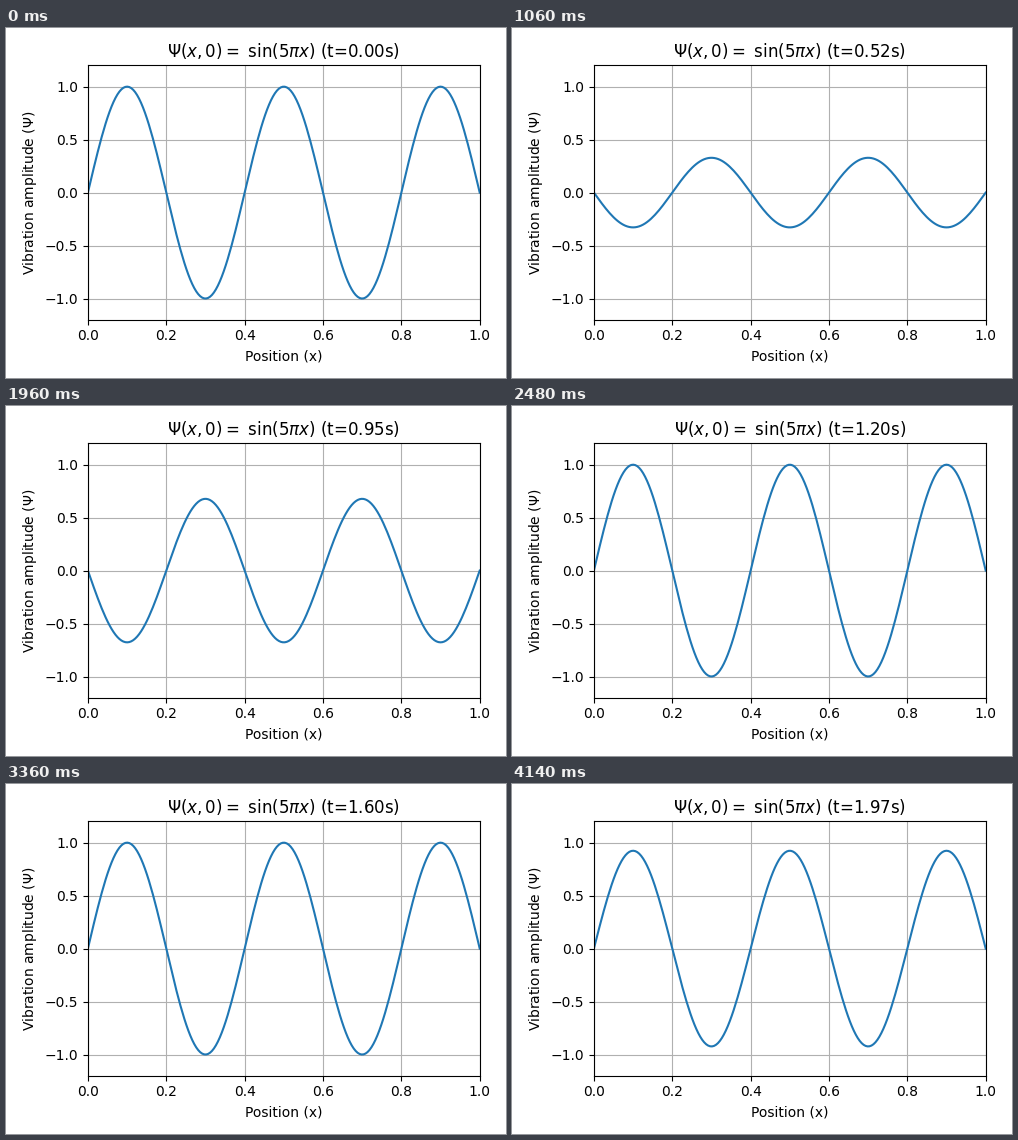
A matplotlib script that plays this animation: 500 by 350 pixels, repeating every 4.16 s.

```python
import numpy as np
import matplotlib.pyplot as plt
from matplotlib.animation import FuncAnimation

TICK = 20                          # ms per animation frame
HOLDS = [1, 5, 1, 5, 1] * 16       # ticks each pose stays on screen
POSES = np.repeat(np.arange(len(HOLDS)), HOLDS)

x = np.linspace(0, 1, 200)
times = np.linspace(0, 2, 400)
shape = np.sin(5 * np.pi * x)


def title(t):
    return rf"$\Psi(x,0)=\ \sin(5\pi x)$ (t={t:.2f}s)"


fig, ax = plt.subplots(figsize=(5, 3.5), dpi=100)
line, = ax.plot(x, shape)
ax.set_xlim(0, 1)
ax.set_ylim(-1.2, 1.2)
ax.set_xlabel("Position (x)")
ax.set_ylabel(r"Vibration amplitude ($\Psi$)")
ax.set_title(title(0))
ax.grid(True)
fig.tight_layout()
fig.subplots_adjust(top=0.893, right=0.9474)


def update(frame):
    # Every fifth time sample is shown, after the initial state
    t = times[max(0, 5 * POSES[frame] - 1)]
    line.set_ydata(shape * np.cos(5 * np.pi * t))
    ax.set_title(title(t))
    return line, ax.title


anim = FuncAnimation(fig, update, frames=len(POSES), interval=TICK,
                     repeat=True, repeat_delay=0, blit=False)
plt.show()
```
